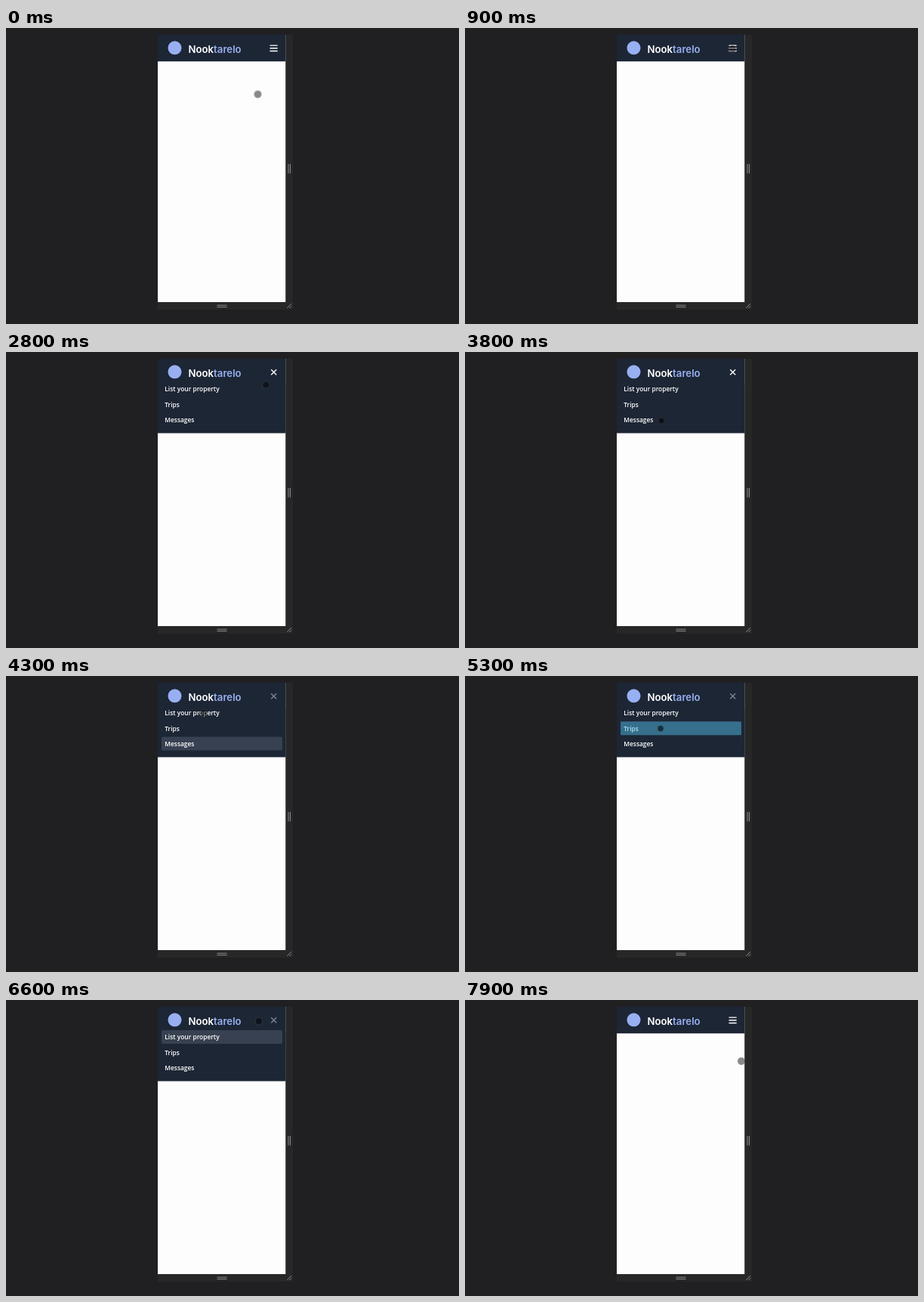
Write an HTML page that moves like this. It is 600 px wide and 392 px high and loops after 8000 ms.

```html
<!DOCTYPE html>
<html lang="en">
<head>
<meta charset="utf-8">
<title>Mobile menu</title>
<style>
html, body { margin: 0; width: 100%; height: 100%; overflow: hidden; background: #202022; }
svg { display: block; width: 600px; height: 392px; }
text { font: 600 8.4px "Open Sans", sans-serif; fill: #fff; }
.brand { font: 600 13.2px Inter, sans-serif; }
.brand tspan { fill: #98aff2; }
.row { fill: #384151; }
.tap { fill: #33b5e5; fill-opacity: .4; }
.icon { fill: none; stroke: #fff; stroke-width: 1.4; }

/* every part shares one clock */
.menu, .bar, .close, .row, .tap, .cursor, .dot { animation: 8s step-end -20ms infinite; }
.menu { animation-name: open; }
.bar { animation-name: closed; }
.close { animation-name: dim; }
.row, .tap { opacity: 0; }
.property.row { animation-name: property-hover; }
.property.tap { animation-name: property-tap; }
.trips.row { animation-name: trips-hover; }
.trips.tap { animation-name: trips-tap; }
.messages.row { animation-name: messages-hover; }
.messages.tap { animation-name: messages-tap; }
.toggle.tap { animation-name: toggle-tap; }
.cursor { animation-name: move; animation-timing-function: ease-in-out; }
.dot { animation-name: press; fill: #000; fill-opacity: .46; stroke: #777; stroke-opacity: .3; stroke-width: 1; }

@keyframes open { 0%, 92.5%, 100% { opacity: 0 } 17.5% { opacity: 1 } }
@keyframes closed { 0%, 92.5%, 100% { opacity: 1 } 17.5% { opacity: 0 } }
@keyframes dim { 0%, 92.5%, 100% { stroke: #fff } 48.75% { stroke: #7c8595 } }
@keyframes messages-hover { 0%, 66.25%, 100% { opacity: 0 } 48.75% { opacity: 1 } }
@keyframes messages-tap { 0%, 51.25%, 100% { opacity: 0 } 48.75% { opacity: 1 } }
@keyframes trips-hover { 0%, 78.75%, 100% { opacity: 0 } 66.25% { opacity: 1 } }
@keyframes trips-tap { 0%, 68.75%, 100% { opacity: 0 } 66.25% { opacity: 1 } }
@keyframes property-hover { 0%, 92.5%, 100% { opacity: 0 } 78.75% { opacity: 1 } }
@keyframes property-tap { 0%, 81.25%, 100% { opacity: 0 } 78.75% { opacity: 1 } }
@keyframes toggle-tap { 0%, 21.25%, 95%, 100% { opacity: 0 } 17.5%, 92.5% { opacity: 1 } }
@keyframes press {
  0%, 20%, 51.25%, 68.75%, 80%, 95%, 100% { transform: scale(1); fill-opacity: .46 }
  13.75%, 47.5%, 63.75%, 77.5%, 88.75% { transform: scale(.85); fill-opacity: .58 }
}
@keyframes move {
  0%, 1.25% { transform: translate(333.5px, 87.7px) }
  12.5%, 31.25% { transform: translate(354.5px, 27px) }
  35% { transform: translate(349.5px, 40.5px); animation-timing-function: ease-out }
  42.5%, 51.25% { transform: translate(260px, 91px) }
  53.75% { transform: translate(262px, 49px) }
  56.25%, 57.5% { transform: translate(261px, 48px) }
  62.5%, 68.75% { transform: translate(259px, 69.5px) }
  73.75%, 80% { transform: translate(258px, 50px) }
  82.5% { transform: translate(333px, 28px); animation-timing-function: ease-out }
  87.5%, 95% { transform: translate(354.5px, 27px) }
  98.75%, 100% { transform: translate(366px, 81px) }
}
</style>
</head>
<body>
<svg viewBox="0 0 600 392">
  <defs><clipPath id="screen"><path d="M201 9h169.5v354H201z"/></clipPath></defs>

  <!-- device frame -->
  <path fill="#272727" d="M201 9h179v364H201z"/>
  <g fill="none" stroke="#8d8d8d">
    <path d="M374 180v12.5M376.5 180v12.5M279.5 367.2h13M279.5 369.6h13"/>
    <path d="M372.3 370.8l5.7-5.7M375.5 371l2.7-2.7"/>
  </g>

  <g clip-path="url(#screen)">
    <path fill="#fefdfe" d="M201 9h169.5v354H201z"/>
    <path fill="#1d2635" d="M201 9h169.5v35.3H201z"/>

    <g class="menu">
      <path fill="#1d2635" d="M201 44h169.5v63.5H201z"/>
      <rect class="property row" x="206" y="40" width="160" height="18" rx="2.3"/>
      <rect class="trips row" x="206" y="60.3" width="160" height="18" rx="2.3"/>
      <rect class="messages row" x="206" y="80.6" width="160" height="18" rx="2.3"/>
      <text x="210.3" y="52.4">List your property</text>
      <text x="210.3" y="72.7">Trips</text>
      <text x="210.3" y="93">Messages</text>
      <rect class="property tap" x="206" y="40" width="160" height="18"/>
      <rect class="trips tap" x="206" y="60.3" width="160" height="18"/>
      <rect class="messages tap" x="206" y="80.6" width="160" height="18"/>
      <path class="icon close" d="M351.2 23.2l7 7m0-7l-7 7"/>
    </g>

    <circle cx="223.5" cy="26.3" r="9" fill="#98aff2"/>
    <text class="brand" x="241.5" y="33">Nook<tspan>tarelo</tspan></text>
    <path class="icon bar" d="M349.5 23.1h10.2m-10.2 3.7h10.2m-10.2 3.7h10.2"/>
    <rect class="toggle tap" x="348" y="20" width="13.5" height="13.5"/>

    <g class="cursor"><circle class="dot" r="4.8"/></g>
  </g>
</svg>
</body>
</html>
```
